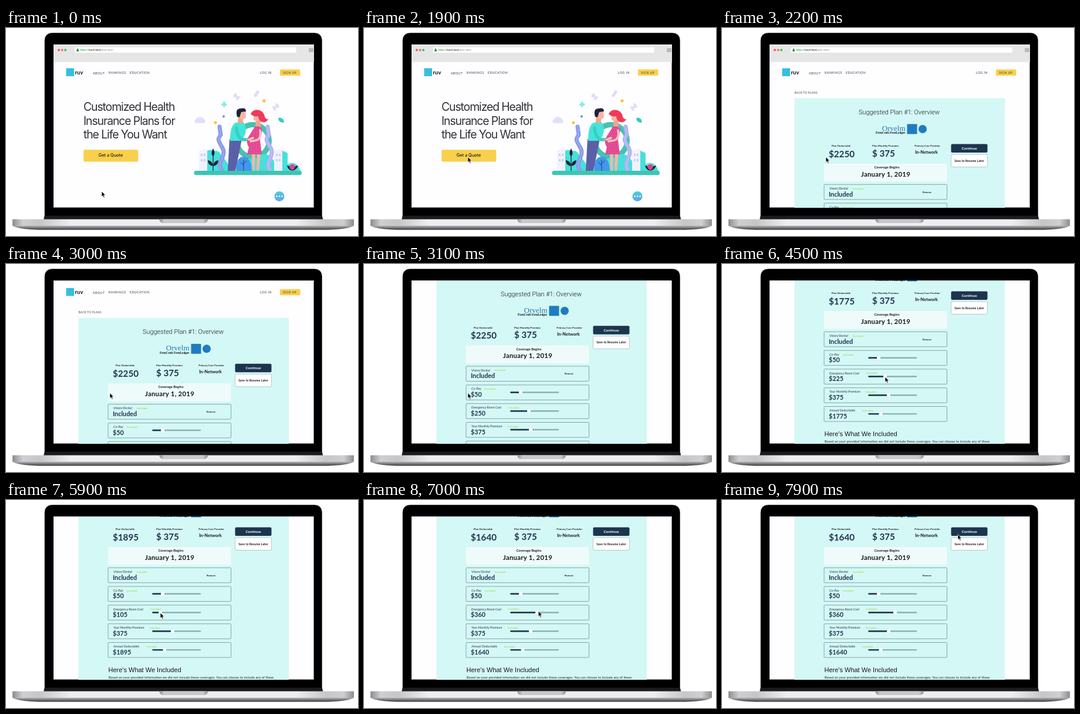
An HTML page for the animation above (8 s loop, 600 px wide and 354 px high).

```html
<!DOCTYPE html>
<html lang="en">
<head>
<meta charset="utf-8">
<title>Health plan walkthrough</title>
<style>
html, body { margin: 0; width: 100%; height: 100%; overflow: hidden; background: #fff; }
svg { display: block; width: 600px; height: 354px; }
text { font-family: Lato, sans-serif; fill: #16181c; white-space: pre; }
.nav text { font-size: 5.2px; letter-spacing: .45px; fill: #3a3a3a; }
.url { font: 5px "Liberation Sans", sans-serif; }
.hero text { font: 19.4px Inter, sans-serif; letter-spacing: -1.1px; fill: #303236; }
.mid { text-anchor: middle; }
.b { font-weight: 700; }
.label { font-size: 4.45px; font-weight: 700; text-anchor: middle; }
.big { font-size: 15.2px; font-weight: 700; fill: #1d344e; }
.value { font-size: 10.8px; font-weight: 700; fill: #1d344e; }
.field { font-size: 5.55px; font-style: italic; fill: #2c3d46; }
.tag { font-size: 4.6px; letter-spacing: .1px; fill: #86dc1c; }
.limb { fill: none; stroke-linecap: round; }

#home { animation: leave 8s infinite step-end; }
#plan { animation: enter 8s infinite step-end; }
#page { animation: scroll 8s infinite linear; }
#cursor { animation: point 8s infinite ease-in-out; }

@keyframes leave { 0% { visibility: visible } 27.4%, 100% { visibility: hidden } }
@keyframes enter { 0% { visibility: hidden } 27.4%, 100% { visibility: visible } }
@keyframes scroll {
  0%, 32.5% { transform: translateY(0); animation-timing-function: ease-in }
  37.5% { transform: translateY(-27px) }
  39.9%, 100% { transform: translateY(-151px) }
}
@keyframes point {
  0%, 11.25% { transform: translate(163px, 278px) }
  17.5%, 43.75% { transform: translate(177px, 219.5px) }
  51.25% { transform: translate(281px, 192px) }
  55% { transform: translate(281px, 192px); animation-timing-function: linear }
  62.5% { transform: translate(263px, 192px) }
  73.75% { transform: translate(263px, 192px); animation-timing-function: linear }
  83.75%, 86.25% { transform: translate(295px, 192px) }
  98.6%, 100% { transform: translate(402px, 58.5px) }
}
</style>
</head>
<body>
<svg viewBox="0 0 600 354">
  <defs>
    <clipPath id="screen"><path d="M81 28H524.6V305.6H81z"/></clipPath>
    <linearGradient id="plate">
      <stop offset="0" stop-color="#8c8c90"/><stop offset=".03" stop-color="#cfcfd2"/>
      <stop offset=".08" stop-color="#c6c6c9"/><stop offset=".17" stop-color="#eeeef0"/>
      <stop offset=".83" stop-color="#eeeef0"/><stop offset=".92" stop-color="#c6c6c9"/>
      <stop offset=".97" stop-color="#cfcfd2"/><stop offset="1" stop-color="#8c8c90"/>
    </linearGradient>
    <linearGradient id="lip" x2="0" y2="1">
      <stop offset="0" stop-color="#b4b4b7"/><stop offset="1" stop-color="#3c3c40"/>
    </linearGradient>
    <linearGradient id="notch">
      <stop offset="0" stop-color="#8d8d91"/><stop offset=".1" stop-color="#c9c9cc"/>
      <stop offset=".9" stop-color="#c9c9cc"/><stop offset="1" stop-color="#8d8d91"/>
    </linearGradient>
    <linearGradient id="chat" x2="0" y2="1">
      <stop offset="0" stop-color="#4fcdd8"/><stop offset="1" stop-color="#5ea6ec"/>
    </linearGradient>
    <pattern id="dots" width="5" height="5" patternUnits="userSpaceOnUse">
      <path d="M0 0H5V5H0z" fill="#e24a94"/><circle cx="2" cy="2" r=".5" fill="#f78fbd"/>
    </pattern>
    <path id="weed" class="limb" d="M0 0C-10 -13 9 -24 1 -38S-8 -52 -2 -60T-4 -74"/>
    <g id="tower">
      <path d="M0 0V-34L14 -38V0z" fill="#f1f2fd"/>
      <path d="M3 -29h3v4h-3zm5 0h3v4h-3zm-5 9h3v4h-3zm5 0h3v4h-3z" fill="#c8d0f5"/>
    </g>
  </defs>

  <!-- laptop -->
  <path d="M66 320V22Q66 8.500 79.500 8.500H525Q538.500 8.500 538.500 22V320L540 326H64.500z" fill="#000" stroke="#2a2a2d" stroke-width=".6"/>
  <path d="M66 319.500H538.500L540 326H64.500z" fill="#1b1b1d"/>
  <path d="M11 325.500H593V337H11z" fill="url(#plate)"/>
  <path d="M11 336.500H593Q582 343.500 538 343.500H66Q22 343.500 11 336.500z" fill="url(#lip)"/>
  <path d="M261.500 325.500H344Q344 332 337 332H268.500Q261.500 332 261.500 325.500z" fill="url(#notch)"/>

  <g clip-path="url(#screen)">
    <path d="M80 27H525V306H80z" fill="#fefdff"/>
    <g id="page">
      <path d="M80 27H525V58H80z" fill="#e7e6e7"/>
      <circle cx="90" cy="37.5" r="1.9" fill="#f4505c"/>
      <circle cx="95.7" cy="37.5" r="1.9" fill="#ef6f66"/>
      <circle cx="101.2" cy="37.5" r="1.9" fill="#35c04b"/>
      <rect x="117.5" y="33" width="377" height="9" rx="1" fill="#fff"/>
      <path d="M120.3 37H124V40H120.3zM121 37V36a1.2 1.2 0 0 1 2.4 0V37" fill="#2f9a45"/>
      <text class="url" x="126" y="39.4" style="fill:#2f9a45">https://<tspan fill="#222">zuvrl.test</tspan><tspan fill="#999">/plan-item</tspan></text>
      <path d="M516 35H524M516 37.4H524M516 39.8H524" stroke="#8d8d8d" stroke-width="1.2"/>

      <path d="M102.5 68.5H116V82H102.5z" fill="#36bfdc"/>
      <text class="b" x="117.5" y="78.6" font-size="9.5">ruv</text>
      <g class="nav">
        <text x="148" y="78.6">ABOUT</text>
        <text x="175" y="77.8">RANKINGS</text>
        <text x="211" y="77.8">EDUCATION</text>
        <text x="433" y="77.8">LOG IN</text>
        <rect x="467" y="70.5" width="34.5" height="10.5" rx="1.5" fill="#f9cf4c"/>
        <text x="472" y="77.6">SIGN UP</text>
      </g>

      <g id="home">
        <g class="hero">
          <text x="132" y="141">Customized Health</text>
          <text x="132" y="165">Insurance Plans for</text>
          <text x="132" y="188">the Life You Want</text>
        </g>
        <rect x="132.3" y="207.3" width="93" height="20.2" rx="2" fill="#f9cf4c"/>
        <text class="mid" x="178.5" y="218.8" style="font:500 7.3px Inter,sans-serif">Get a Quote</text>

        <!-- floating bits -->
        <path d="M323 162a4 4 0 0 1 1-7a7 6 0 0 1 13 0a4 4 0 0 1 1 7z" fill="#e0e0fa"/>
        <g fill="#f8c63f"><circle cx="357" cy="161" r="2.6"/><circle cx="440" cy="124" r="2.7"/></g>
        <circle cx="371" cy="150.5" r="2" fill="#6f86ec"/>
        <path class="limb" d="M368.5 130H375M371.8 126.8V133.2" stroke="#84ebe6" stroke-width="3.4"/>
        <g class="limb" stroke="#dcdcf8" stroke-width="3.6">
          <path d="M390 114L395.500 119.500M389 116L392 113M394 121L397 118"/>
          <path d="M457 137L463 132M456 135L459 139M461 130L464 134"/>
          <path d="M425 115L429 109" stroke-width="5"/>
        </g>
        <path d="M464 153Q473 151 474 161Q465 162 464 153z" fill="#35c9bd"/>

        <!-- garden -->
        <circle cx="421" cy="192" r="27.5" fill="none" stroke="#48c1b2" stroke-width="9"/>
        <path d="M340 243V212Q346 204 354 210Q362 206 368 218Q376 226 386 243z" fill="#46e0da"/>
        <path d="M396 243Q412 218 428 221Q440 208 452 220L470 243z" fill="#46e0da"/>
        <path d="M470 243V208L480 213V232Q495 224 502 243z" fill="#46e0da"/>
        <use href="#tower" x="329" y="243"/>
        <use href="#tower" x="457" y="243"/>
        <g stroke-width="7">
          <use href="#weed" x="368" y="242" stroke="#8a9ce8"/>
          <use href="#weed" x="450" y="242" stroke="#b0b3f3"/>
        </g>
        <g stroke-width="1" stroke-dasharray="1 2">
          <use href="#weed" x="368" y="242" stroke="#c3ccf8"/>
          <use href="#weed" x="450" y="242" stroke="#dadbfb"/>
        </g>
        <path d="M353 243V208" stroke="#1f2338" stroke-width="1.3"/>
        <path d="M353 235Q344 234 344 225Q352 226 353 235zM353 235Q362 234 362 225Q354 226 353 235zM353 219Q348 213 353 205Q358 213 353 219z" fill="#1f2338"/>
        <path d="M488 243Q480 241 479 234Q487 235 488 243zM488 243Q496 241 498 234Q489 235 488 243z" fill="#1f2338"/>
        <circle cx="488" cy="236.5" r="4.5" fill="#e5408c"/>
        <path d="M392 243Q392 219 405 219Q418 219 419 243z" fill="#4297ec"/>
        <path class="limb" d="M405 243V225M405 234L400 229M405 231L410 226" stroke="#233c7d"/>

        <!-- couple -->
        <path d="M381 189H402L397 214L391 243H378z" fill="#5a60a8"/>
        <path d="M382 192C382 178 384 164 392 161L404 159.5Q411 167 408 180L402 192z" fill="#45e4d8"/>
        <path class="limb" d="M393 170Q394 187 404 190L413 190" stroke="#38cfc6" stroke-width="5.5"/>
        <path class="limb" d="M412 190L420 190" stroke="#f8b5a5" stroke-width="4"/>
        <path d="M396 150H404V161L399 163L395 160z" fill="#f3a58c"/>
        <path d="M396 141H408L409 152Q406 157 399 154z" fill="#f8b5a5"/>
        <path d="M394 151Q390 137 400 137Q409 135 409 142L401 143L398 152z" fill="#1f2338"/>
        <path d="M419 212H425L424 243H420zM428 212H434L431 243H427z" fill="#f8b5a5"/>
        <path d="M426 154H434V170L425 169z" fill="#f3a58c"/>
        <path d="M424 168Q433 165 437 173L433 190L436 215H411L414 203Q407 193 416 181z" fill="url(#dots)"/>
        <path class="limb" d="M433 174Q436 188 427 191L417 193M421 187L414 190" stroke="#f9c3bd" stroke-width="3.6"/>
        <path d="M422 146L432 145V157Q427 161 422 156z" fill="#f8b5a5"/>
        <path d="M417 146Q422 137 432 140Q440 143 441 151Q443 156 447 155Q444 162 436 160Q430 157 430 150Q422 152 417 146z" fill="#ef3b58"/>
        <rect x="320.5" y="243" width="183.5" height="7.3" rx="3.6" fill="#3cc5b4"/>

        <circle cx="466" cy="286.5" r="8.5" fill="url(#chat)"/>
        <path class="limb" d="M461.5 286.5H471" stroke="#fff" stroke-width="2.6" stroke-dasharray="0 4.5"/>
      </g>

      <g id="plan">
        <text class="b" x="123.5" y="111.8" font-size="4.8" letter-spacing=".2" style="fill:#777">BACK TO PLANS</text>
        <path d="M123.5 119.5H482V500H123.5z" fill="#d4f8f5"/>
        <text class="mid" x="302" y="147" style="font:300 10.9px Roboto,sans-serif">Suggested Plan #1: Overview</text>

        <text x="312.5" y="175" text-anchor="end" style="font:13px 'Liberation Serif',serif;fill:#1f74b8">Orvelm</text>
        <text x="312.5" y="180.3" text-anchor="end" style="font:bold 5.2px 'Liberation Serif',serif">FernCroft FernLedger</text>
        <path d="M315.5 163.5H332.5V180.5H315.5z" fill="#1f7cc0"/>
        <circle cx="342" cy="172" r="7" fill="#1f7cc0"/>

        <text class="label" x="203" y="202">Plan Deductable</text>
        <text class="label" x="278.5" y="202">Plan Monthly Premium</text>
        <text class="label" x="350" y="202">Primary Care Provider</text>
        <text class="big" id="total" x="182" y="219.7">$2250</text>
        <text class="big" x="256" y="218.5">$ 375</text>
        <text class="b mid" x="348.5" y="214" font-size="7.5">In-Network</text>

        <rect x="390.5" y="197.5" width="62" height="14.5" rx="2" fill="#1d344e"/>
        <text class="b mid" x="421.5" y="206.9" font-size="6.4" style="fill:#fff">Continue</text>
        <rect x="390.5" y="215" width="62" height="21.5" rx="2" fill="#fff" stroke="#a9bcc2" stroke-width=".8"/>
        <text class="b mid" x="421.5" y="227.5" font-size="5.1" letter-spacing=".1">Save to Resume Later</text>

        <path d="M174 231H383.5V261.5H174z" fill="#effbfb"/>
        <text class="b mid" x="281" y="239" font-size="5.8">Coverage Begins</text>
        <text class="b mid" x="279" y="252.6" font-size="11.4" letter-spacing=".25">January 1, 2019</text>

        <g id="rows"></g>

        <text x="174.5" y="444" style="font:11px 'Liberation Sans',sans-serif">Here's What We Included</text>
        <text x="175" y="455" font-size="5.4" letter-spacing=".17">Based on your provided information we did not include these coverages. You can choose to include any of these</text>
      </g>
    </g>

    <path id="cursor" d="M0 0V9.200L2.100 7.300L3.600 10.700L5.200 10L3.700 6.700H6.600z" fill="#000" stroke="#fff" stroke-width=".7"/>
  </g>
</svg>
<script>
const LOOP = 8000, TRACK = 250.5;
const $ = id => document.getElementById(id);

// field name, value, tag x, knob x
const rows = [
  ['Vision/Dental', 'Included', 223],
  ['Co-Pay', '$50', 206, 267],
  ['Emergency Room Cost', '$250', 246, 281],
  ['Your Monthly Premium', '$375', 245, 284],
  ['Annual Deductable', '$2250', 239, 270.5]
];
const rowTop = i => 266.3 + 31.8 * i;
const trackY = i => rowTop(i) + 12.6;

const slider = (knob, y, i) => `
  <path d="M${TRACK} ${y}H331" stroke="#8db0b3" stroke-width="2.4" stroke-linecap="round"/>
  <path id="fill${i}" d="M${TRACK} ${y}H${knob}" stroke="#1d344e" stroke-width="2.4" stroke-linecap="round"/>
  <circle id="knob${i}" cx="${knob}" cy="${y}" r="3" fill="#fff"/>`;

$('rows').innerHTML = rows.map(([name, value, tagX, knob], i) => {
  const y = rowTop(i);
  return `
    <rect x="174" y="${y}" width="209.5" height="25.5" rx="1" fill="none" stroke="#6f9097" stroke-width=".8"/>
    <text class="field" x="183" y="${y + 8.6}">${name}</text>
    <text class="tag" x="${tagX}" y="${y + 8.4}">Included</text>
    <text class="value" id="value${i}" x="182" y="${y + 20.2}">${value}</text>` +
    (knob ? slider(knob, trackY(i), i)
          : `<text class="b" x="342" y="${y + 14.2}" font-size="4.2">Remove</text>`);
}).join('');

const ramp = (t, from, to) => Math.min(1, Math.max(0, (t - from) / (to - from)));

function draw() {
  const t = performance.now() % LOOP;
  const first = ramp(t, 4400, 5000), second = ramp(t, 5900, 6700);
  const knob = 281 - 18 * first + 32 * second;
  const cost = Math.round((250 - 145 * first + 255 * second) / 5) * 5;
  const deductible = '$' + (first > 0 ? 2000 - cost : 2250);
  $('knob2').setAttribute('cx', knob);
  $('fill2').setAttribute('d', `M${TRACK} ${trackY(2)}H${knob}`);
  $('value2').textContent = '$' + cost;
  $('value4').textContent = $('total').textContent = deductible;
  requestAnimationFrame(draw);
}
draw();
</script>
</body>
</html>
```
